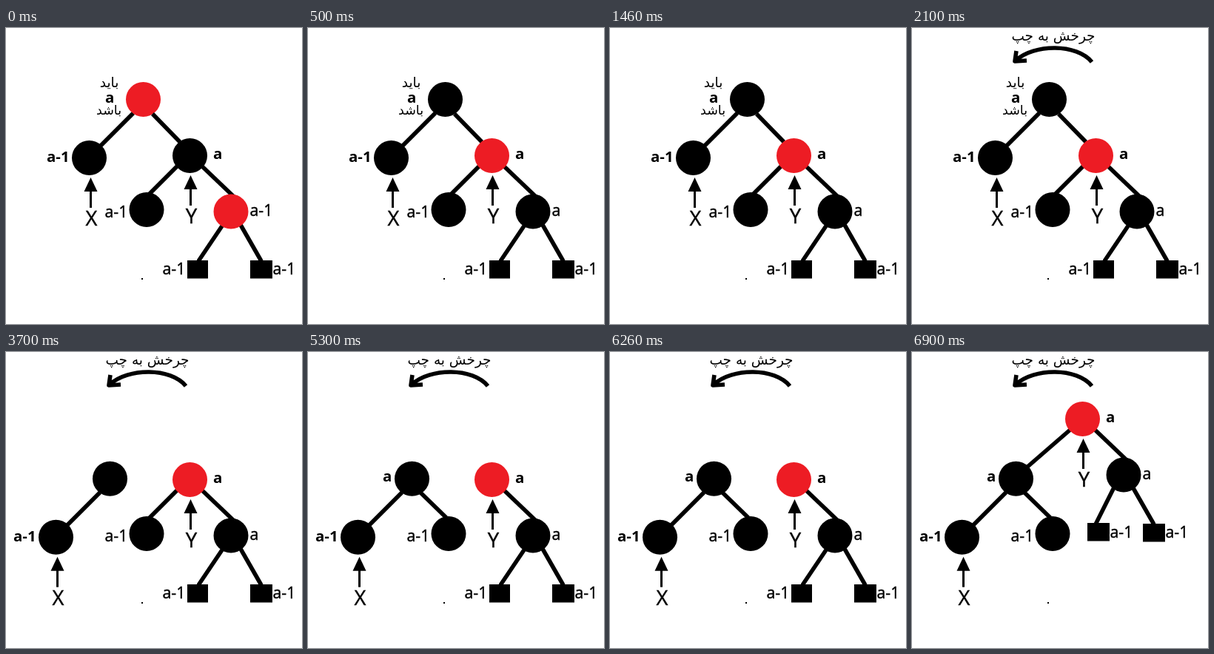
An HTML page for the animation above (8 s loop, 400 by 400 pixels).

```html
<!DOCTYPE html>
<html lang="en">
<head>
<meta charset="utf-8">
<title>Tree rotation</title>
<style>
html, body { margin: 0; width: 100%; height: 100%; overflow: hidden; background: #fff; }
svg { display: block; width: 400px; height: 400px; }
text { font-family: "Open Sans", "Noto Sans", sans-serif; font-size: 21.3px; stroke: #000; stroke-width: .4px; }
.bold { font-weight: 700; font-size: 20.4px; stroke: none; }
.name { font-size: 27.5px; text-anchor: middle; }
.fa { font-family: "DejaVu Sans", sans-serif; text-anchor: middle; stroke: none; }
path { fill: none; stroke: #000; stroke-width: 5.6; }
</style>
</head>
<body>
<svg id="stage" viewBox="0 0 400 400"></svg>
<script>
const RED = "#ed1c24", BLACK = "#000";
const starts = [0, 500, 2100, 3700, 5300, 6900], LOOP = 8000;

const node = (x, y, fill = BLACK) => `<circle cx="${x}" cy="${y}" r="23.5" fill="${fill}"/>`;
const leaf = (x, y, w) => `<rect x="${x}" y="${y}" width="${w}" height="24.5"/>`;
const edge = (...p) => `<path d="M${p}"/>`;
const label = (s, x, y, cls = "") => `<text class="${cls}" x="${x}" y="${y}">${s}</text>`;
const persian = (s, x, y, size) =>
  `<text class="fa" direction="rtl" x="${x}" y="${y}" style="font-size:${size}px">${s}</text>`;
const move = (x, y, s) => `<g transform="translate(${x} ${y})">${s}</g>`;
const pointer = (s, x, y) =>
  `<path d="M${x} ${y + 15}V${y + 41}" style="stroke-width:3"/>` +
  `<path d="M${x} ${y}l9 19h-18z" style="fill:#000;stroke:none"/>` +
  label(s, x + 1, y + 65, "name");

// Parent with its left child, marked X
const leftTree = rootColor =>
  edge(172, 115, 127, 160) + node(185.5, 96.5, rootColor) + node(112.5, 175.5) +
  label("a-1", 55, 181, "bold") + pointer("X", 114.5, 202);

// Y with its right child and two leaves
const rightTree = (stage) => {
  const last = stage === 5, flipped = stage > 0;
  return edge(264, 186, 308, 228) +
    (last ? edge(291, 265, 266, 315) : edge(293, 266, 260, 315)) +
    edge(317, 266, 345, 315) +
    node(248.5, 172.5, flipped ? RED : BLACK) + node(304, 248, flipped ? BLACK : RED) +
    (last ? leaf(255, 313, 30) : leaf(245, 314, 28)) + leaf(330, 314, 30) +
    label("a", 280, 177, "bold") + label(flipped ? "a" : "a-1", 329.5, 254) +
    label("a-1", last ? 285.5 : 211.5, 333) + label("a-1", 360.5, 333) +
    pointer("Y", 249.5, 199);
};

const turn = persian("چرخش به چپ", 191, 17, 18.5) +
  `<path d="M243 46C223 21 165 21 140 44M141 31L139 45L155 44" stroke-linejoin="round"/>`;

function draw(stage) {
  const split = stage >= 3, joined = stage >= 4, last = stage === 5;
  let s = split ? move(-45, 74.7, leftTree(BLACK)) : leftTree(stage ? BLACK : RED);
  if (!split) {
    s += edge(198, 116, 235, 154) + persian("باید", 139.5, 80, 18.5) +
      label("a", 134, 101, "bold") + persian("باشد", 139, 117, 17.5);
  }
  s += joined ? edge(151, 189, 187, 224) + label("a", 101, 175, "bold") : edge(231, 187, 192, 226);
  if (last) s += edge(215, 104, 155, 156);
  s += node(190, 245.5) + label("a-1", 133.5, 256);
  s += last ? move(-18, -82, rightTree(stage)) : rightTree(stage);
  if (stage >= 2) s += turn;
  return s + `<rect x="183" y="338" width="2" height="2"/>`;
}

const svg = document.getElementById("stage");
let shown = -1;
function tick() {
  const t = performance.now() % LOOP;
  const stage = starts.filter(at => at <= t).length - 1;
  if (stage !== shown) svg.innerHTML = draw(shown = stage);
  requestAnimationFrame(tick);
}
tick();
</script>
</body>
</html>
```
